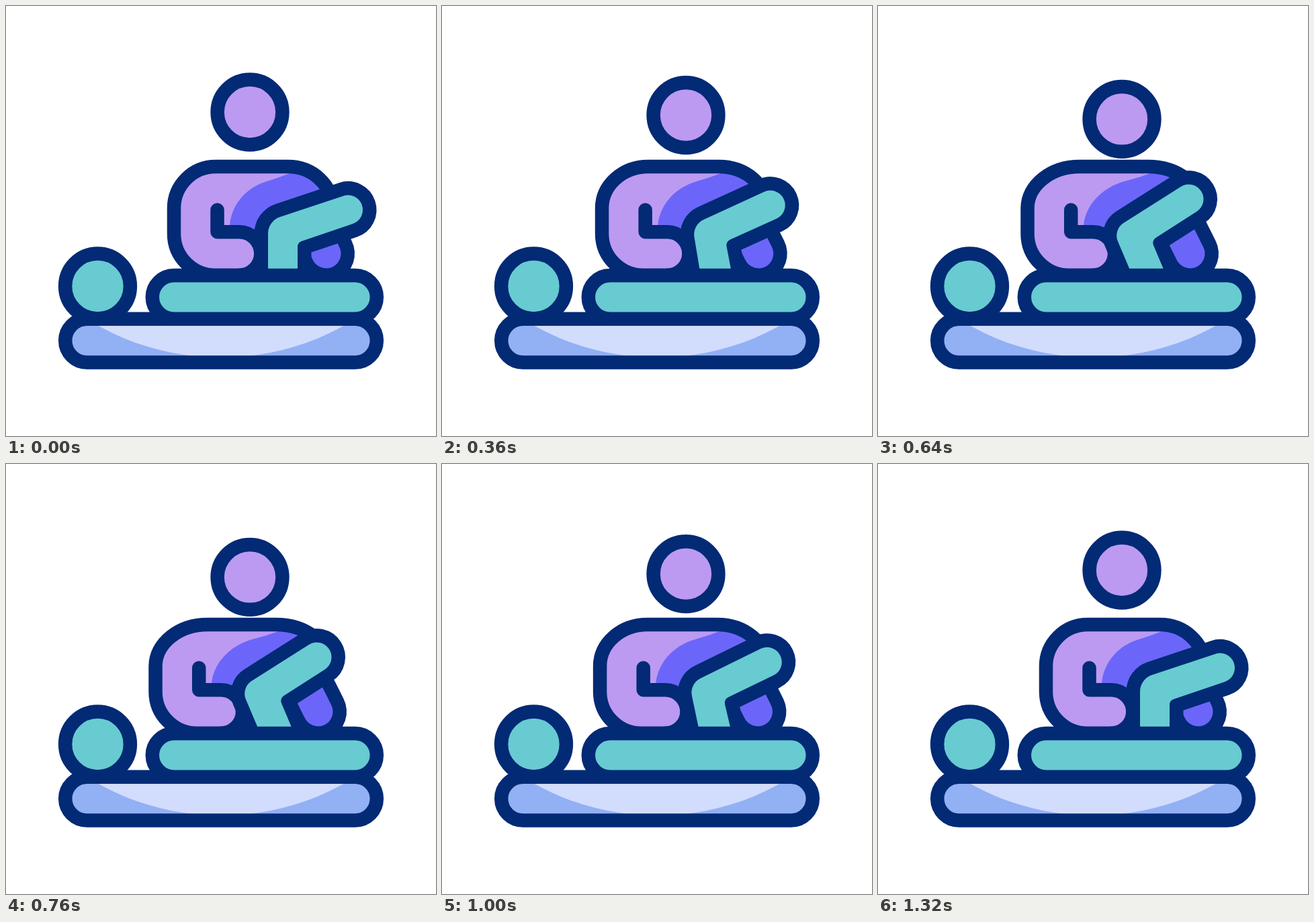
An HTML page with a canvas for the animation above (1400 ms loop, 640 by 640 pixels).

```html
<!DOCTYPE html>
<html lang="en">
<head>
<meta charset="utf-8">
<title>Massage</title>
<style>
  html, body { margin: 0; width: 100%; height: 100%; overflow: hidden; background: #fff; }
  canvas { display: block; width: 640px; height: 640px; }
</style>
</head>
<body>
<canvas id="stage" width="640" height="640"></canvas>
<script>
const ctx = document.getElementById('stage').getContext('2d');

const NAVY = '#032a75', TEAL = '#67cbd1', LILAC = '#bc9af2', VIOLET = '#6b66f9';
const BLUE = '#92b0f4', PALE = '#d2dcfd';
const LINE = 20.5, LIMB = 44, ROUND = 0.5523;
const LOOP = 1400, STEP = 40, START = 80, PEAK = 700;

// Lean amount against time from rest, mirrored on the way back.
const LEAN = [[0, 0], [120, 0.055], [160, 0.1], [280, 0.435], [440, 0.84], [560, 1], [620, 1.025]];

function slope(i) {
  if (i === 0 || i === LEAN.length - 1) return 0;
  const [t0, v0] = LEAN[i - 1], [t1, v1] = LEAN[i + 1];
  return (v1 - v0) / (t1 - t0);
}

function leanAt(time) {
  const t = Math.max(0, PEAK - START - Math.abs(time - PEAK));
  let i = 0;
  while (i < LEAN.length - 2 && t > LEAN[i + 1][0]) i++;
  const [t0, v0] = LEAN[i], [t1, v1] = LEAN[i + 1];
  const span = t1 - t0, u = (t - t0) / span;
  const s = u * u * (3 - 2 * u);
  return v0 + (v1 - v0) * s
    + span * u * (1 - u) * (slope(i) * (1 - u) - slope(i + 1) * u);
}

function fill(color, path) {
  ctx.fillStyle = color;
  ctx.fill(path);
}

function stroke(color, width, path) {
  ctx.strokeStyle = color;
  ctx.lineWidth = width;
  ctx.stroke(path);
}

function shape(build) {
  const path = new Path2D();
  build(path);
  return path;
}

function head(x, y, color) {
  const path = shape(p => p.arc(x, y, 48.4, 0, Math.PI * 2));
  fill(color, path);
  stroke(NAVY, LINE, path);
}

function slab(x, y, w, h, color, shine) {
  const path = shape(p => p.roundRect(x, y, w, h, h / 2));
  fill(color, path);
  if (shine) {
    ctx.save();
    ctx.clip(path);
    fill(PALE, shape(p => p.arc(320, 147, 376.3, 0, Math.PI * 2)));
    ctx.restore();
  }
  stroke(NAVY, LINE, path);
}

function torso(mix) {
  const left = mix(250, 222.5), topL = mix(312, 300), low = mix(312, 284.5);
  const topR = mix(420, 402), right = mix(486, 482), hand = mix(347, 319.7);
  const k = 1 - ROUND;

  const outline = shape(p => {
    p.moveTo(right, 301);
    p.bezierCurveTo(right, 239 + 62 * k, right - (right - topR) * k, 239, topR, 239);
    p.lineTo(topL, 239);
    p.bezierCurveTo(left + (topL - left) * k, 239, left, 239 + 62 * k, left, 301);
    p.lineTo(left, 339);
    p.bezierCurveTo(left, 401 - 62 * k, left + 62 * k, 401, low, 401);
    p.lineTo(hand, 401);
  });
  fill(LILAC, outline);

  ctx.save();
  ctx.clip(outline);
  fill(VIOLET, shape(p => {
    p.moveTo(mix(332, 305), 336);
    p.lineTo(mix(333, 306), 327);
    p.bezierCurveTo(mix(335, 308), mix(298, 300), mix(355, 330), mix(272, 270),
      mix(385, 370), mix(262, 260));
    p.quadraticCurveTo(mix(405, 390), mix(256, 255), mix(425, 408), 248);
    p.lineTo(mix(425, 408), 230);
    p.lineTo(500, 230);
    p.lineTo(500, 336);
  }));
  ctx.restore();
  stroke(NAVY, LINE, outline);

  const elbow = mix(314.5, 287.2);
  stroke(NAVY, LINE, shape(p => {
    p.moveTo(elbow, 303.5);
    p.lineTo(elbow, 336.2);
    p.lineTo(hand, 336.2);
    p.arc(hand, 368.5, 32.3, -Math.PI / 2, Math.PI / 2);
  }));
}

function hip(mix) {
  const x = mix(476.5, 464.5), y = 368.5;
  const path = shape(p => {
    p.moveTo(x, y);
    p.lineTo(x - 22, y - 44);
  });
  stroke(NAVY, LIMB + 2 * LINE, path);
  stroke(VIOLET, LIMB, path);
}

function bentLeg(mix) {
  const r = LIMB / 2;
  const footX = mix(509, 462.5), footY = mix(303.5, 287.5);
  const tilt = mix(0.322, 0.567);
  const nx = r * Math.sin(tilt), ny = r * Math.cos(tilt);
  const path = shape(p => {
    p.moveTo(mix(390, 378), 400);
    p.arcTo(mix(390, 349.7), mix(320, 333.1), footX - nx, footY - ny, mix(26, 22));
    p.lineTo(footX - nx, footY - ny);
    p.arc(footX, footY, r, -Math.PI / 2 - tilt, Math.PI / 2 - tilt);
    p.arcTo(mix(434, 407), mix(352, 349), mix(434, 428.5), 400, 9);
    p.lineTo(mix(434, 428.5), 400);
    p.closePath();
  });
  stroke(NAVY, 2 * LINE, path);
  fill(TEAL, path);
}

function draw(time) {
  const lean = leanAt(time);
  const mix = (a, b) => a + (b - a) * lean;
  ctx.fillStyle = '#fff';
  ctx.fillRect(0, 0, 640, 640);
  ctx.lineCap = ctx.lineJoin = 'round';

  torso(mix);
  hip(mix);
  bentLeg(mix);
  head(363, mix(158, 168.4), LILAC);
  head(136.5, 417, TEAL);
  slab(88.2, 465.7, 463.6, 64.8, BLUE, true);
  slab(217.8, 401, 334, 64.7, TEAL, false);
}

const begin = performance.now();
function tick() {
  const time = (performance.now() - begin) % LOOP;
  draw(Math.floor(time / STEP) * STEP);
  requestAnimationFrame(tick);
}
tick();
</script>
</body>
</html>
```
